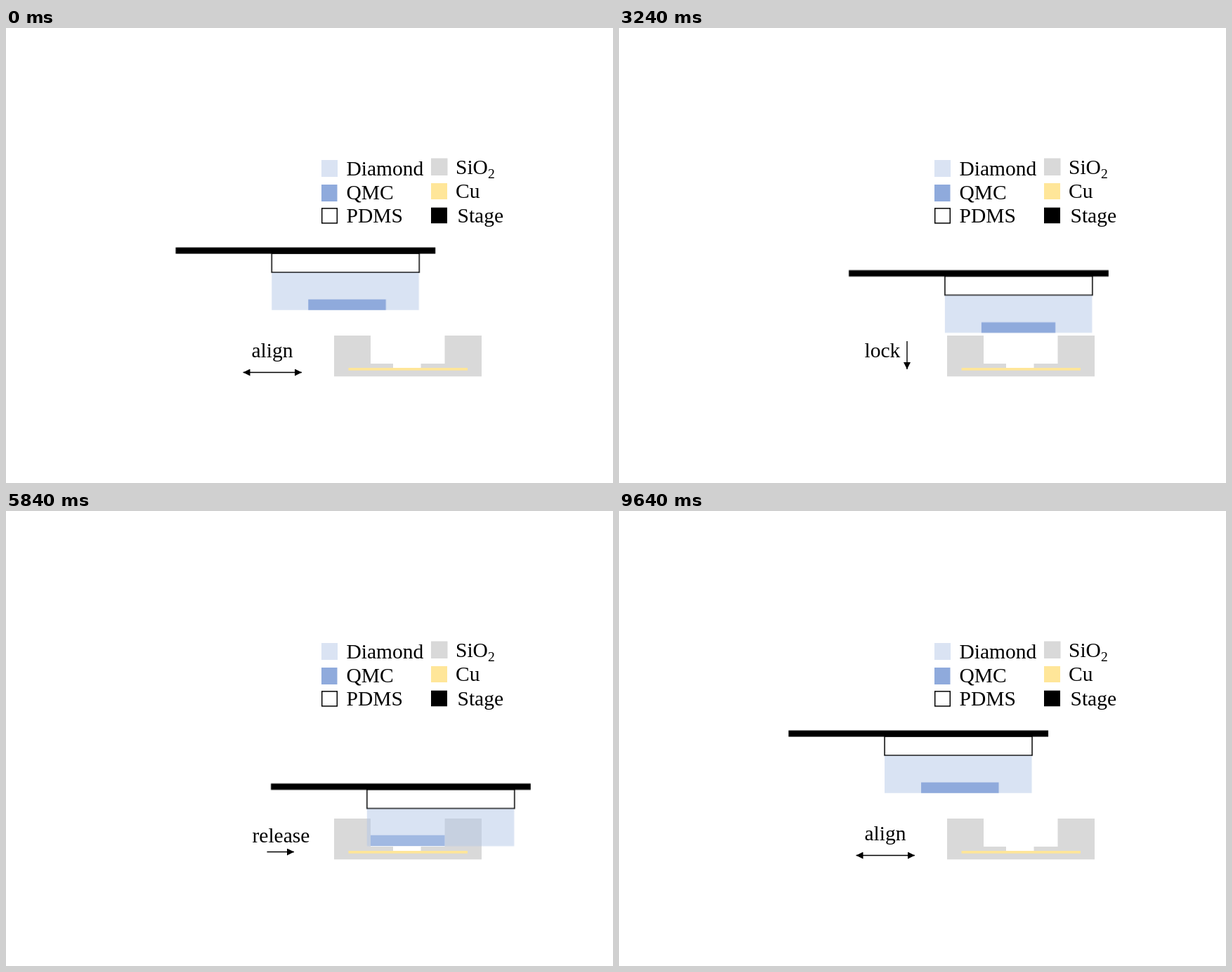
An HTML page that plays this animation: 864x648 px, repeating every 9.68 s.

```html
<!DOCTYPE html>
<html lang="en">
<head>
<meta charset="utf-8">
<title>Pick and place transfer</title>
<style>
  html, body { margin: 0; width: 100%; height: 100%; overflow: hidden; background: #fff; }
  svg { display: block; width: 864px; height: 648px; }
  text { font: 29.5px "Liberation Serif", "Times New Roman", serif; }
  .sub { font-size: 19.6px; }
  .diamond { fill: #b4c7e7; fill-opacity: .5; }
  .qmc { fill: #8faadc; }
  .pdms { fill: #fff; stroke: #000; stroke-width: 1.5; }
  .sio2 { fill: #d9d9d9; }
  .cu { fill: #ffe699; }
  .arrow { stroke: #000; stroke-width: 1.4; }

  /* --slot: when a scene is shown, --start: when its motion begins */
  .scene { animation: show 9680ms step-end calc(var(--slot) - 9680ms) infinite; }
  .head  { animation: move 9680ms linear calc(var(--start) - 9680ms) infinite; }
  .label { animation: fade 9680ms linear calc(var(--start) - 9680ms) infinite; }

  #align   { --slot: -70ms;  --start: -70ms;  --x0: 0;    --y0: 0;    --x1: 87;   --y1: -.7; }
  #lock    { --slot: 2350ms; --start: 2330ms; --x0: 83.7; --y0: -.5;  --x1: 88.7; --y1: 77.2; }
  #release { --slot: 4770ms; --start: 4790ms; --x0: 88.5; --y0: 75.6; --x1: 173;  --y1: 75.6; }
  #retract { --slot: 7190ms; --start: 7234ms; --x0: 173;  --y0: 75.4; --x1: 173;  --y1: .5; }

  @keyframes show {
    0% { visibility: visible; }
    25%, 100% { visibility: hidden; }
  }
  /* constant acceleration, then constant deceleration */
  @keyframes move {
    0% {
      transform: translate(calc(var(--x0) * 1px), calc(var(--y0) * 1px));
      animation-timing-function: cubic-bezier(.3333, 0, .6667, .3333);
    }
    10.227% {
      transform: translate(calc((var(--x0) + var(--x1)) * .5px), calc((var(--y0) + var(--y1)) * .5px));
      animation-timing-function: cubic-bezier(.3333, .6667, .6667, 1);
    }
    20.455%, 60% { transform: translate(calc(var(--x1) * 1px), calc(var(--y1) * 1px)); }
    60.01%, 100% { transform: translate(calc(var(--x0) * 1px), calc(var(--y0) * 1px)); }
  }
  @keyframes fade {
    0%, 20.455% { opacity: 1; }
    25.3%, 60% { opacity: 0; }
    60.01%, 100% { opacity: 1; }
  }
</style>
</head>
<body>
<svg viewBox="0 0 864 648">
  <defs>
    <g id="holder">
      <rect class="pdms" x="378" y="321" width="210" height="27"/>
      <rect x="241.3" y="312.5" width="369.7" height="9"/>
      <rect class="diamond" x="378" y="348.5" width="209.5" height="53.2"/>
    </g>
    <marker id="tip" markerUnits="userSpaceOnUse" markerWidth="10" markerHeight="10"
            refX="10" refY="5" orient="auto-start-reverse">
      <path d="M0 0L10 5L0 10Z"/>
    </marker>
  </defs>

  <g id="legend">
    <rect x="449" y="188" width="23" height="24" fill="#dae3f3"/>
    <rect class="qmc" x="449" y="223" width="22.5" height="24"/>
    <rect class="pdms" x="449.7" y="256.9" width="21.6" height="21"/>
    <rect class="sio2" x="605" y="185.5" width="23.5" height="24.5"/>
    <rect class="cu" x="605" y="221" width="23" height="23"/>
    <rect x="605" y="255.7" width="23" height="22.5"/>
    <text x="484.5" y="210">Diamond</text>
    <text x="484.5" y="244">QMC</text>
    <text x="484.5" y="277">PDMS</text>
    <text x="640" y="208">SiO<tspan class="sub" dy="6">2</tspan></text>
    <text x="640" y="242">Cu</text>
    <text x="642.5" y="277">Stage</text>
  </g>

  <g id="socket">
    <path class="sio2" d="M467 438H519V478H551V485H590.5V478H624.5V438H677V496.2H467Z"/>
    <rect class="cu" x="487.5" y="484" width="169.5" height="3.7"/>
  </g>

  <g id="align" class="scene">
    <g class="head">
      <use href="#holder"/>
      <rect class="qmc" x="430" y="386.5" width="110.5" height="15.2"/>
    </g>
    <g class="label">
      <text x="349.5" y="469">align</text>
      <path class="arrow" d="M337.5 490.5H421" marker-start="url(#tip)" marker-end="url(#tip)"/>
    </g>
  </g>

  <g id="lock" class="scene">
    <g class="head">
      <use href="#holder"/>
      <rect class="qmc" x="430" y="386.7" width="105.3" height="15"/>
    </g>
    <g class="label">
      <text x="349.5" y="469">lock</text>
      <path class="arrow" d="M410 446V486" marker-end="url(#tip)"/>
    </g>
  </g>

  <g id="release" class="scene">
    <rect class="qmc" x="519" y="461.7" width="105.5" height="15.3"/>
    <g class="head"><use href="#holder"/></g>
    <g class="label">
      <text x="350.5" y="472">release</text>
      <path class="arrow" d="M371.5 485.5H410" marker-end="url(#tip)"/>
    </g>
  </g>

  <g id="retract" class="scene">
    <rect class="qmc" x="519" y="461.7" width="105.5" height="15.3"/>
    <g class="head"><use href="#holder"/></g>
    <g class="label">
      <text x="345.5" y="476">retract</text>
      <path class="arrow" d="M438.5 482V452.5" marker-end="url(#tip)"/>
    </g>
  </g>
</svg>
</body>
</html>
```
